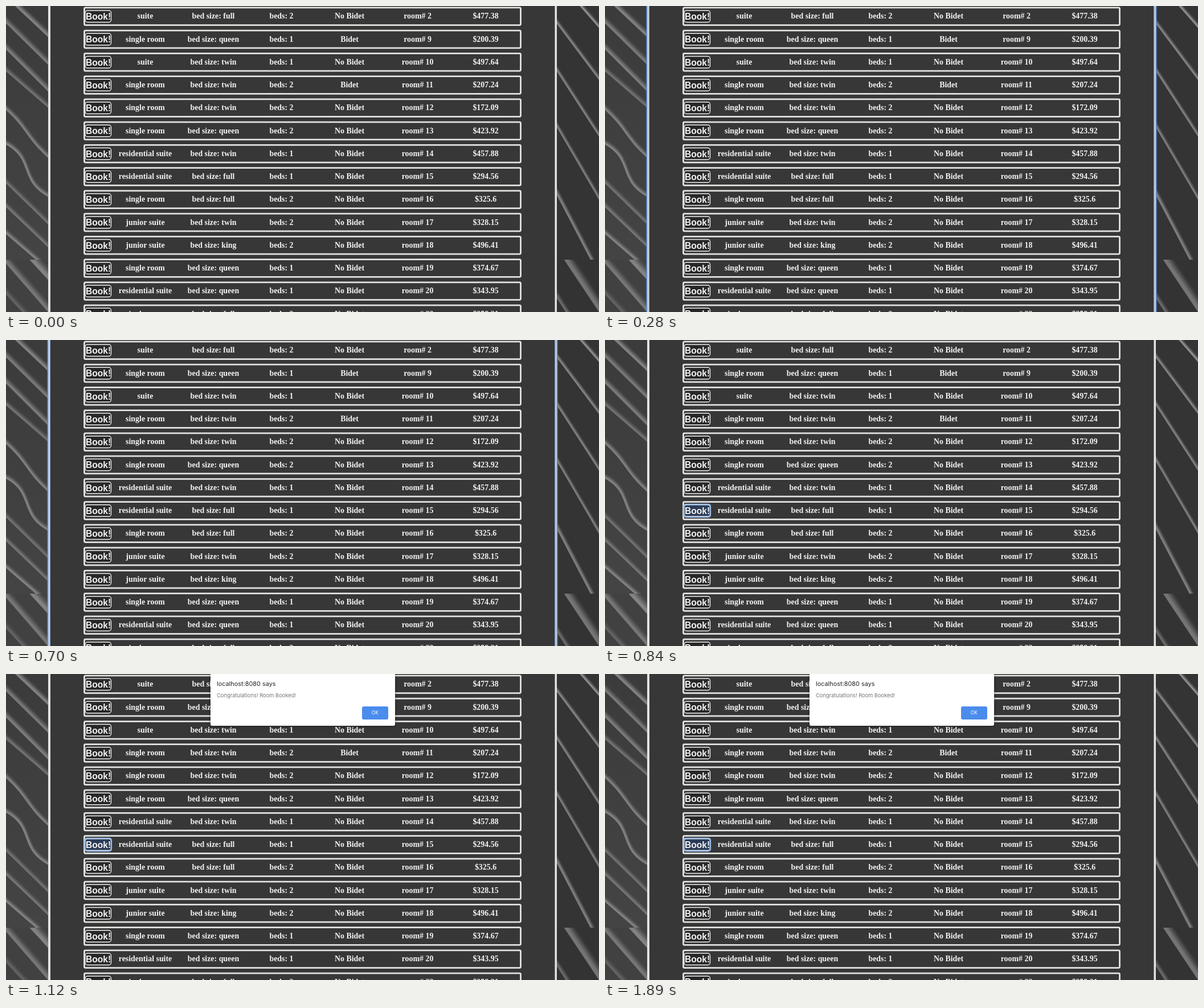
These frames come from a looping animation (1041x538 px, 1960 ms). An HTML page with a canvas:

```html
<!DOCTYPE html>
<html lang="en">
<head>
<meta charset="utf-8">
<title>Room booking</title>
<style>
  html, body { margin: 0; width: 100%; height: 100%; overflow: hidden; background: #373737; }
  canvas { display: block; position: absolute; left: 0; top: 0; }
  #dialog {
    position: absolute; left: 359px; top: 0; width: 323.5px; height: 91px;
    background: #fff; border-radius: 0 0 3px 3px; box-shadow: 0 1px 5px rgba(0, 0, 0, .4);
    transform-origin: 50% 100%; font-family: Inter, Roboto, sans-serif; white-space: nowrap;
    visibility: hidden;
  }
  #dialog * { position: absolute; line-height: 14px; }
  #dialog b { left: 11px; top: 9.5px; font-size: 10.9px; font-weight: 400; color: #222; }
  #dialog p { left: 11px; top: 31px; margin: 0; font-size: 9.35px; color: #757575; }
  #dialog i {
    left: 265.5px; top: 56.5px; width: 46.5px; height: 23px; line-height: 23px;
    border-radius: 3px; background: #4a8cec; color: #fff;
    font-size: 8.4px; font-style: normal; text-align: center;
  }
</style>
</head>
<body>
<canvas id="stage" width="1041" height="538"></canvas>
<div id="dialog"><b>localhost:8080 says</b><p>Congratulations! Room Booked!</p><i>OK</i></div>
<script>
const W = 1041, H = 538, LOOP = 1960, STEP = 70;
const TILE = 446, ROW_H = 40.25, FOCUS_ROW = 7;
const LIGHT = '#e2e2e0';
const ctx = document.getElementById('stage').getContext('2d');
const dialog = document.getElementById('dialog');
const columns = [244.5, 364, 483.5, 603, 722.5, 842];

// type, bed size, beds, bidet, room number, price
const rooms = `suite,full,2,,2,477.38
single room,queen,1,y,9,200.39
suite,twin,1,,10,497.64
single room,twin,2,y,11,207.24
single room,twin,2,,12,172.09
single room,queen,2,,13,423.92
residential suite,twin,1,,14,457.88
residential suite,full,1,,15,294.56
single room,full,2,,16,325.6
junior suite,twin,2,,17,328.15
junior suite,king,2,,18,496.41
single room,queen,1,,19,374.67
residential suite,queen,1,,20,343.95
single room,full,2,,22,258.21`.split('\n').map(line => {
  const [type, size, beds, bidet, room, price] = line.split(',');
  return [type, 'bed size: ' + size, 'beds: ' + beds, bidet ? 'Bidet' : 'No Bidet', 'room# ' + room, '$' + price];
});

function clipped(x, y, w, h, fill, draw) {
  ctx.save();
  ctx.beginPath();
  ctx.rect(x, y, w, h);
  ctx.clip();
  ctx.fillStyle = fill;
  ctx.fillRect(x, y, w, h);
  draw();
  ctx.restore();
}

// A fold of cloth: thin bright crest with a fading shade underneath
function fold(x1, y1, x2, y2, width, tone, bend = 0) {
  const mx = (x1 + x2) / 2, my = (y1 + y2) / 2;
  const path = d => {
    ctx.beginPath();
    ctx.moveTo(x1, y1 + d);
    ctx.bezierCurveTo(mx + bend, my - bend + d, mx - bend, my + bend + d, x2, y2 + d);
  };
  for (let i = 4; i >= 0; i--) {
    const v = Math.round(tone - i * (tone - 66) / 5);
    ctx.strokeStyle = `rgba(${v},${v},${v},${1 - i * .18})`;
    ctx.lineWidth = width * (.6 + i * .22);
    path(-i * width * .25);
    ctx.stroke();
  }
}

function gradient(y, h, from, to) {
  const g = ctx.createLinearGradient(0, y, 0, y + h);
  g.addColorStop(0, from);
  g.addColorStop(1, to);
  return g;
}

function drawBackdrop() {
  clipped(0, 0, 75, TILE, gradient(0, TILE, '#3b3b3b', '#444'), () => {
    fold(10, -8, 82, 60, 6, 128);
    fold(-8, 20, 82, 109, 6, 120);
    fold(-8, 66, 82, 156, 6, 122);
    fold(-8, 106, 82, 184, 5, 112);
    fold(-8, 174, 82, 272, 5, 126, 6);
    fold(-8, 238, 82, 338, 5, 128, 20);
    fold(-8, 302, 82, 390, 5, 112);
    fold(-8, 344, 82, 430, 5, 116);
    fold(-8, 392, 66, 456, 5, 128);
  });
  clipped(0, TILE, 75, H - TILE, '#414141', () => {
    fold(38, 438, 84, 488, 10, 130);
    fold(-8, 440, 82, 544, 8, 118);
    fold(-8, 496, 40, 548, 6, 98);
  });
  clipped(966, 0, 75, TILE, '#343434', () => {
    fold(1000, -10, 1049, 46, 4, 142);
    fold(960, 20, 1049, 139, 4, 130);
    fold(960, 102, 1049, 240, 4, 126);
    fold(960, 199, 1049, 352, 4, 124);
    fold(960, 316, 1034, 458, 5, 124);
  });
  clipped(966, TILE, 75, H - TILE, '#333', () => {
    fold(978, 438, 1050, 546, 10, 116);
    fold(960, 500, 992, 550, 5, 104);
  });
}

function box(x, y, w, h, r, line, color, fill) {
  ctx.beginPath();
  ctx.roundRect(x, y, w, h, r);
  if (fill) {
    ctx.fillStyle = fill;
    ctx.fill();
  }
  ctx.lineWidth = line;
  ctx.strokeStyle = color;
  ctx.stroke();
}

function drawPanel(ring) {
  ctx.fillStyle = LIGHT;
  ctx.fillRect(74, 0, 893, H);
  ctx.fillStyle = '#373737';
  ctx.fillRect(78, 0, 885.5, H);
  if (!ring) return;
  const bar = (x, w, color) => {
    ctx.fillStyle = color;
    ctx.fillRect(x, 0, w, H);
  };
  ctx.globalAlpha = ring;
  for (const [outer, inner] of [[72.5, 76.5], [966.5, 963.5]]) {
    bar(outer, 2, '#5f91d6');
    bar(inner, 1.3, '#7f9fcf');
  }
  ctx.globalAlpha = 1;
}

function drawRow(cells, i, focused) {
  const y = i * ROW_H;
  box(137.5, y + 2.8, 766, 30.8, 2, 2.8, LIGHT);
  box(139, y + 8, 45.5, 20.5, 4, 1.4, '#f0f0f0', focused ? '#2b3b57' : '#272727');
  if (focused) box(138.3, y + 6.8, 47, 23, 4, 1.8, '#86b2ea');
  ctx.fillStyle = '#f2f2f2';
  ctx.font = 'bold 15.6px "Liberation Sans", Arial, sans-serif';
  ctx.fillText('Book!', 162, y + 24);
  ctx.font = 'bold 13.9px "Liberation Serif", Times, serif';
  cells.forEach((text, c) => ctx.fillText(text, columns[c], y + 22.4));
}

function showDialog(t) {
  const opening = t < 1120;
  dialog.style.visibility = t < 1050 ? 'hidden' : 'visible';
  dialog.style.opacity = opening ? .5 : 1;
  dialog.style.transform = opening
    ? 'translateY(-9px) matrix3d(1,0,0,0, 0,1.02,0,-.00046, 0,0,1,0, 0,0,0,1)'
    : 'none';
}

function render(now) {
  const t = Math.floor((now % LOOP) / STEP) * STEP;
  const ring = t < 840 ? Math.min(1, t / 280) : 0;
  ctx.textAlign = 'center';
  ctx.clearRect(0, 0, W, H);
  drawBackdrop();
  drawPanel(ring);
  rooms.forEach((cells, i) => drawRow(cells, i, i === FOCUS_ROW && t >= 840));
  showDialog(t);
}

const start = performance.now();
function tick() {
  render(performance.now() - start);
  requestAnimationFrame(tick);
}
tick();
</script>
</body>
</html>
```
